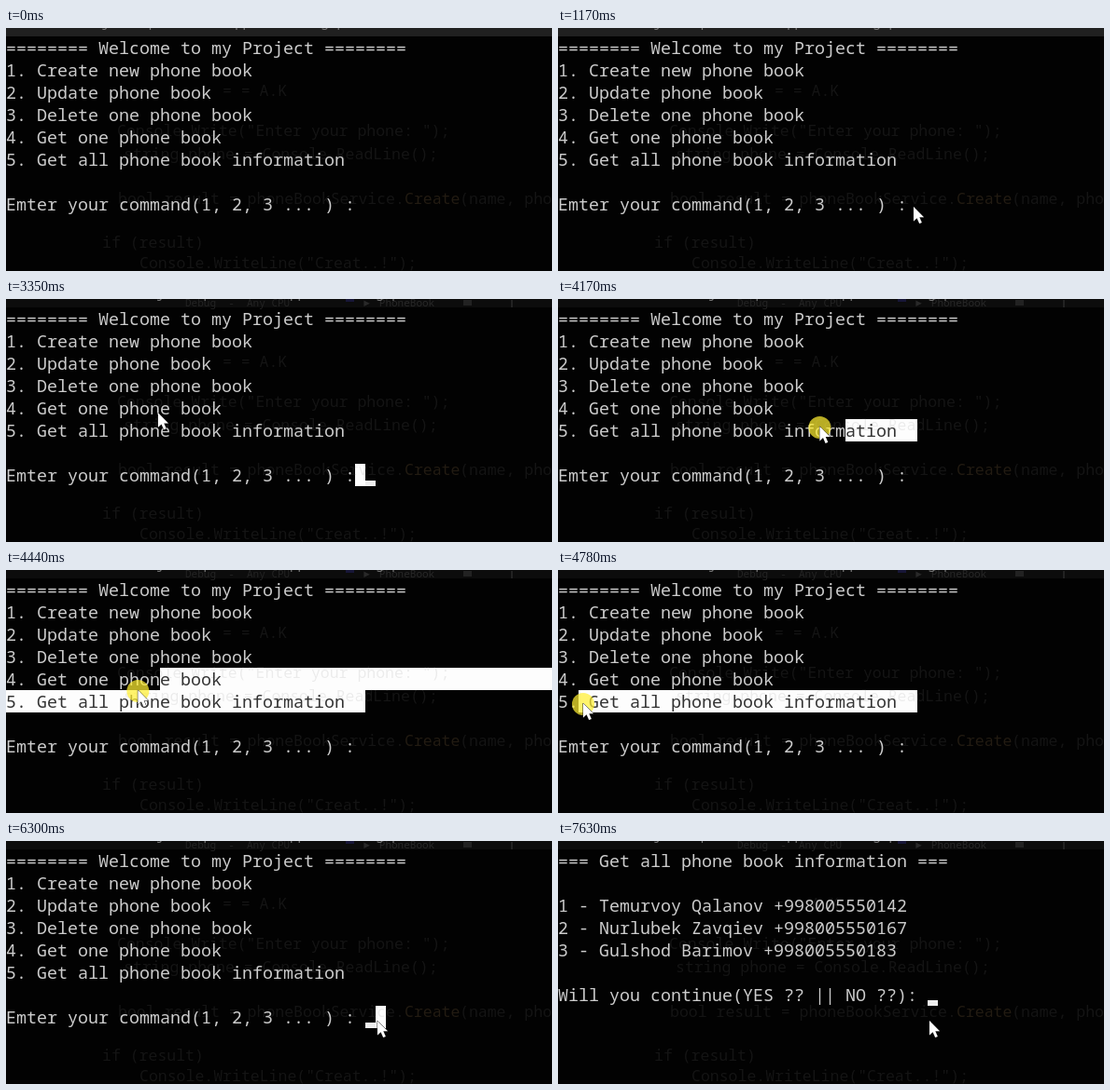
Recreate the animation shown at these times as an HTML page with a canvas. Size 585 px wide and 261 px high, loop 8000 ms.

```html
<!DOCTYPE html>
<html lang="en">
<head>
<meta charset="utf-8">
<style>
  html, body { margin: 0; width: 100%; height: 100%; overflow: hidden; background: #020202; }
  canvas { display: block; }
</style>
</head>
<body>
<canvas id="stage" width="585" height="261"></canvas>
<script>
const ctx = document.getElementById('stage').getContext('2d');
const LOOP = 8000, COL = 11, ROW = 24, TOP = 9;
const MONO = '"Noto Sans Mono", monospace';

const menu = [
  '======== Welcome to my Project ========',
  '1. Create new phone book',
  '2. Update phone book',
  '3. Delete one phone book',
  '4. Get one phone book',
  '5. Get all phone book information',
  '',
  'Emter your command(1, 2, 3 ... ) : '
];
const listing = [
  '=== Get all phone book information ===',
  '',
  '1 - Temurvoy Qalanov +998005550142',
  '2 - Nurlubek Zavqiev +998005550167',
  '3 - Gulshod Barimov +998005550183',
  '',
  'Will you continue(YES ?? || NO ??): '
];

// Editor code shining through the console: text, x, baseline
const ghostCode = [
  ['= = A.K', 232, 73],
  ['Console.Write("Enter your phone: ");', 119, 116],
  ['string phone = Console.ReadLine();', 126, 141],
  ['bool result = phoneBookService.', 120, 189],
  ['(name, phone);', 486, 189],
  ['if (result)', 103, 236],
  ['Console.WriteLine("Creat..!");', 143, 258]
];

// Pointer path: time, x, y
const path = [
  [140, 238, 222], [300, 221, 172], [560, 221, 172], [640, 217, 169],
  [1170, 381, 192], [2790, 381, 192], [3080, 30, 50], [3300, 110, 118],
  [3560, 380, 140], [3700, 380, 140], [4100, 311, 138], [4170, 281, 137],
  [4300, 205, 124], [4400, 160, 126], [4510, 110, 134], [4710, 27, 143],
  [5100, 27, 143], [5440, 372, 202], [5630, 372, 202], [5700, 398, 193]
];
const presses = [[2240, 2460], [3630, 5100], [5650, 5840]];
const caretOn = [[1370, 1510], [2040, 2570], [3100, 3630], [5240, 5770], [6300, 6830], [7170, 7360], [7560, LOOP]];

const clamp = v => Math.max(0, Math.min(1, v));
const within = (t, [a, b]) => t >= a && t < b;

function pointerAt(t) {
  const next = path.findIndex(p => p[0] > t);
  if (next < 0) return path[path.length - 1].slice(1);
  const [t0, x0, y0] = path[Math.max(0, next - 1)], [t1, x1, y1] = path[next];
  const k = t1 > t0 ? clamp((t - t0) / (t1 - t0)) : 0;
  return [x0 + (x1 - x0) * k, y0 + (y1 - y0) * k];
}

function rect(color, x, y, w, h) {
  ctx.fillStyle = color;
  ctx.fillRect(x, y, w, h);
}

function text(str, x, y, size, color) {
  ctx.font = `${size}px ${MONO}`;
  ctx.fillStyle = color;
  ctx.fillText(str, x, y);
}

function drawBackdrop(t) {
  const focus = clamp((t - 1370) / 270);
  const shade = Math.round(32 - 20 * focus);
  rect('#020202', 0, 0, 585, 261);
  rect(`rgb(${shade},${shade},${shade})`, 0, 0, 585, TOP);
  ctx.globalAlpha = focus;
  text('Debug  -  Any CPU', 192, 8, 11, '#242424');
  text('\u25B6 PhoneBook', 380, 8, 11, '#292929');
  rect('#171638', 364, 0, 9, 3);
  rect('#222', 490, 1, 9, 6);
  rect('#222', 541, 1, 2, 8);
  ctx.globalAlpha = 1;
  const title = (within(t, [2240, 7170]) ? 'Select ' : '') + 'C:\\Projects\\phonebook\\app\\bin\\Debug\\phonebook';
  text(title, 52, -2, 14, '#777');
  for (const [str, x, y] of ghostCode) text(str, x, y, 16.5, '#141414');
  text('Create', 427, 189, 16.5, '#221b12');
}

// Inverts cells from one column to a right edge
function select(row, col, right) {
  ctx.globalCompositeOperation = 'difference';
  rect('#fff', col * COL, TOP + row * ROW, right - col * COL, ROW);
  ctx.globalCompositeOperation = 'source-over';
}

function drawSelection(t) {
  if (within(t, [2260, 3640])) select(7, 34, 385);
  if (within(t, [3640, 5670])) {
    const [x, y] = pointerAt(t - 70);
    const row = Math.floor((y - TOP) / ROW), col = Math.floor(x / COL);
    if (row < 5) {
      select(4, col, 585);
      select(5, 0, 385);
    } else {
      select(5, t > 5100 ? 2 : col, 385);
    }
  }
  if (within(t, [5700, 7170])) select(7, 36, 407);
}

function drawCaret(t) {
  if (!caretOn.some(span => within(t, span))) return;
  const [col, row] = t < 7170 ? [35, 7] : t < 7560 ? [36, 7] : t < 7630 ? [0, 8] : [36, 6];
  rect('#eee', col * COL, TOP + row * ROW + 18, COL, 6);
}

function drawPointer(t) {
  if (t < 140) return;
  const [x, y] = pointerAt(t);
  for (const [down, up] of presses) {
    const glow = Math.min(clamp((t - down) / 80), clamp((up + 130 - t) / 130));
    ctx.fillStyle = `rgba(255,238,50,${0.72 * glow})`;
    ctx.beginPath();
    ctx.arc(x, y + 1, 12, 0, 2 * Math.PI);
    ctx.fill();
  }
  ctx.save();
  ctx.translate(x, y);
  const arrow = new Path2D('M0 0V15.5L3.6 12.2 6.2 18 8.8 16.9 6.3 11.2H11Z');
  ctx.fillStyle = '#fff';
  ctx.strokeStyle = '#222';
  ctx.lineWidth = 1;
  ctx.stroke(arrow);
  ctx.fill(arrow);
  ctx.restore();
}

function draw(t) {
  drawBackdrop(t);
  const lines = t < 7630 ? menu : listing;
  lines.forEach((line, i) => text(line, 0, TOP + i * ROW + 19, COL / 0.6, '#ccc'));
  if (within(t, [7170, 7630])) text('5', 35 * COL, TOP + 7 * ROW + 19, COL / 0.6, '#ccc');
  drawSelection(t);
  drawCaret(t);
  drawPointer(t);
}

const start = performance.now();
function tick() {
  draw((performance.now() - start) % LOOP);
  requestAnimationFrame(tick);
}
tick();
</script>
</body>
</html>
```
